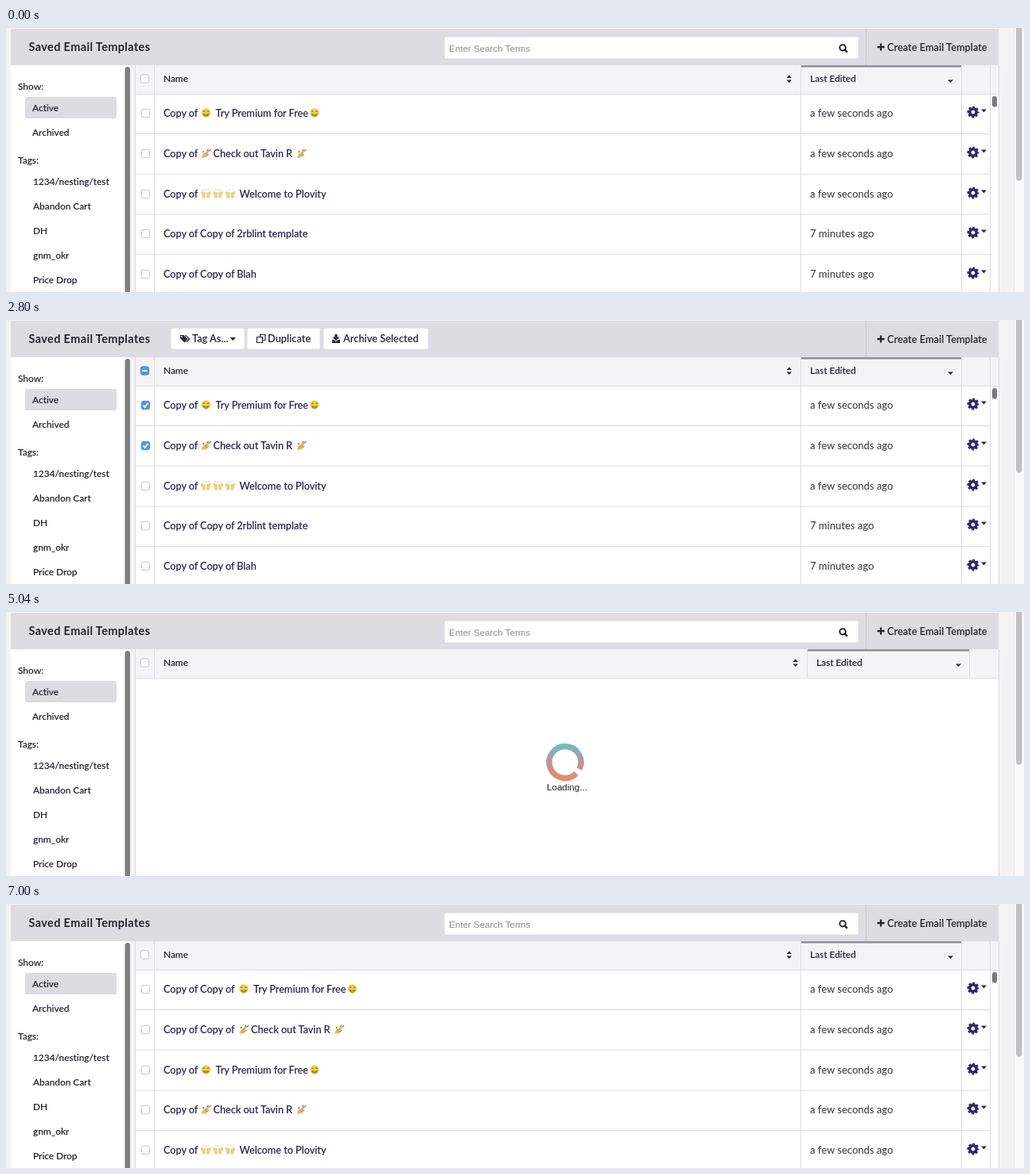
Recreate the animation shown at these times as an HTML page. Size 1280x333 px, loop 7.07 s.

```html
<!DOCTYPE html>
<html lang="en">
<head>
<meta charset="utf-8">
<title>Saved Email Templates</title>
<style>
html, body { margin: 0; width: 100%; height: 100%; overflow: hidden; background: #f3f3f6; }
svg { display: block; }
text { font: 600 12.8px Lato, sans-serif; font-variant-ligatures: none; fill: #25232f; white-space: pre; }
.small { font-size: 12px; letter-spacing: -.1px; }
.title { font-size: 14.5px; font-weight: 700; letter-spacing: .36px; }
.name { fill: #2a2654; letter-spacing: -.1px; }
.date { font-weight: 500; font-size: 13px; fill: #42414b; }
.plain { font: 11.6px "Liberation Sans", Arial, sans-serif; }
.hint { fill: #8e8e92; }
.line { stroke: #dcdce1; fill: none; }
.box { fill: #fff; stroke: #c6c6ca; }
.tick, .dash { fill: none; stroke: #fff; stroke-width: 1.8; visibility: hidden; }
.on .box, .part .box { fill: #5797d8; stroke: #4d8dcf; }
.on .tick, .part .dash { visibility: visible; }
</style>
</head>
<body>
<svg width="1280" height="333" viewBox="0 0 1280 333">
  <defs>
    <linearGradient id="ring" x1="0" y1="-23" x2="0" y2="23" gradientUnits="userSpaceOnUse">
      <stop offset=".08" stop-color="#77bac1"/>
      <stop offset=".5" stop-color="#bd919f"/>
      <stop offset=".9" stop-color="#e48c70"/>
    </linearGradient>
    <g id="money">
      <circle r="5.8" fill="#f1d045"/>
      <path d="M-3.8-1.8h2.4M1.4-1.8H3.8" stroke="#7d8a3a" stroke-width="1.6"/>
      <path d="M-4 1Q0 2.500 4 1Q3 4.500 0 4.500T-4 1" fill="#8c722d"/>
      <path d="M-1.500 2h3v2.500q-1.500 1.500-3 0z" fill="#8fae55"/>
    </g>
    <g id="nails">
      <path d="M-6 5L-3 0L3-4L5-3L2 0L4 1L3 3L0 5L-4 6Z" fill="#e3c06a"/>
      <path d="M-3 3L2-1M-1 4L3 1" stroke="#b0924f" stroke-width=".8"/>
      <path d="M-4-1l1.500-2M1-3l2-2M4-3l2-2" stroke="#9a6f74" stroke-width="1.3"/>
    </g>
    <g id="hands">
      <path id="hand" d="M-1 5L-4 5L-4.500 2L-6-2L-4.500-3L-3 0L-2.500-2L-1.200-1.500L-1 2Z" fill="#f0d678" stroke="#d3b65c" stroke-width=".5"/>
      <use href="#hand" transform="scale(-1 1)"/>
      <path d="M-4-6l1 1.500M0-6v2M4-6l-1 1.500" stroke="#dccb97"/>
    </g>
    <g id="gear" fill="#2b2967">
      <circle r="4.2" fill="none" stroke="#2b2967" stroke-width="3.6"/>
      <circle r="6.2" fill="none" stroke="#2b2967" stroke-width="2.6" stroke-dasharray="2.7 2.169" stroke-dashoffset="1.35"/>
      <path d="M10-3.5h7l-3.5 4z"/>
    </g>
  </defs>

  <path d="M6 1H1248V47H6z" fill="#dedce3"/>
  <path d="M1081.5 1V47" stroke="#c8c6cf"/>
  <text class="title" x="28.5" y="28.5">Saved Email Templates</text>
  <path d="M1095.5 24h9M1100 19.5v9" stroke="#25232f" stroke-width="2.3"/>
  <text x="1108" y="28.5">Create Email Template</text>

  <g id="search">
    <rect x="551.5" y="11.5" width="520" height="27" rx="2" fill="#fff"/>
    <text class="plain hint" x="557" y="29.5">Enter Search Terms</text>
    <circle cx="1052" cy="24.8" r="3.7" fill="none" stroke="#1e1d25" stroke-width="1.9"/>
    <path d="M1054.8 27.6l3 3" stroke="#1e1d25" stroke-width="2.3"/>
  </g>
  <g id="tools">
    <rect x="207.5" y="10.5" width="92" height="26" rx="2" fill="#fff"/>
    <path d="M219 19h4.5l5 5-4 4.5-5.5-5.5zM225 19h1.5l5 5-4 4.5-1-1 3-3.5z" fill="#25232f"/>
    <circle cx="221" cy="21" r="1" fill="#fff"/>
    <text x="234" y="28">Tag As...</text>
    <path d="M281.5 22h7.5l-3.75 4z" fill="#25232f"/>
    <rect id="dup" x="303.5" y="10.5" width="91" height="26" rx="2" fill="#fff"/>
    <path d="M319.5 21v-2.5h6.5v7h-3M315.5 21.5h7v7h-7z" fill="none" stroke="#25232f" stroke-width="1.2"/>
    <text x="329" y="28">Duplicate</text>
    <rect x="399.5" y="10.5" width="131" height="26" rx="2" fill="#fff"/>
    <path d="M413.5 18h3v3.5h3l-4.5 4.5-4.5-4.5h3zM410 25h2.5l2.5 2.3 2.5-2.3h2.5v4h-10z" fill="#25232f"/>
    <text x="424" y="28">Archive Selected</text>
  </g>

  <path d="M6 47H156V333H6z" fill="#fff"/>
  <rect x="149.5" y="49" width="6.5" height="290" rx="3" fill="#7f7f7f"/>
  <rect x="24" y="87" width="115" height="27" rx="2" fill="#dedce3"/>
  <g id="side"></g>

  <path d="M163 47H1248V333H163z" fill="#fff"/>
  <path d="M163 47H1248V83H163z" fill="#f4f4f7"/>
  <path class="line" d="M162.5 47V333M1248.5 47V333M163 83.5H1248M186.5 47V83"/>
  <g id="all" transform="translate(174.5 64)"></g>
  <text class="small" x="198" y="68">Name</text>
  <g id="sort">
    <path d="M981.5 63h6.5l-3.25-3.5zM981.5 65.5h6.5l-3.25 3.5z" fill="#25232f"/>
    <path class="line" d="M999.5 47V83"/>
    <text class="small" x="1011" y="68">Last Edited</text>
  </g>
  <rect id="bar" y="47" height="2.5" fill="#919197"/>
  <g id="end">
    <path d="M1184 65.5h7l-3.5 3.5z" fill="#25232f"/>
    <path class="line" d="M1201.5 47V83"/>
  </g>
  <g id="grid">
    <path class="line" d="M186.5 83V333M999.5 83V333M1201.5 83V333M1237.5 47V333"/>
    <rect x="1240" y="86" width="6" height="13.5" rx="2.5" fill="#7b7b7b"/>
    <g id="before"></g>
    <g id="after"></g>
  </g>
  <g id="loading">
    <g id="spin">
      <path id="arc" fill="none" stroke="url(#ring)" stroke-width="7.3"/>
    </g>
    <text class="plain" x="680" y="225">Loading...</text>
  </g>

  <path d="M1267 0H1280V333H1267z" fill="#fafafa"/>
  <path d="M1267.5 0V333" stroke="#e9e9eb"/>
  <rect x="1270" y="-5" width="7.5" height="197.5" rx="3.7" fill="#c1c1c3"/>
</svg>
<script>
const LOOP = 7070, FIRST = 1890, SECOND = 2450, HOVER = 3500, LOAD = 4480, READY = 5250;
const el = id => document.getElementById(id);
const show = (id, on) => el(id).style.display = on ? '' : 'none';
const text = (x, y, s, cls) => `<text x="${x}" y="${y}" class="${cls}">${s}</text>`;
const icon = (id, x, y) => `<use href="#${id}" x="${x}" y="${y}"/>`;
const check = '<rect class="box" x="-5.2" y="-5.2" width="10.4" height="10.4" rx="2.5"/>' +
  '<path class="tick" d="M-2.8.2L-.8 2.5L3-2.8"/><path class="dash" d="M-3.2 0H3.2"/>';

// Each label draws itself at a horizontal offset and a row centre.
const money = (dx, y) => icon('money', 251.5 + dx, y) +
  text(263.5 + dx, y + 4.5, 'Try Premium for Free', 'name') + icon('money', 388 + dx, y);
const nails = (dx, y) => icon('nails', 251.5 + dx, y) +
  text(260.5 + dx, y + 4.5, 'Check out Tavin R', 'name') + icon('nails', 371.5 + dx, y);
const hands = (dx, y) => [251.5, 266.5, 282].map(x => icon('hands', x + dx, y)).join('') +
  text(293.5 + dx, y + 4.5, 'Welcome to Plovity', 'name');
const copy = (label, twice) => y =>
  text(198, y + 4.5, twice ? 'Copy of Copy of' : 'Copy of', 'name') + label(twice ? 47.5 : 0, y);
const words = s => y => text(198, y + 4.5, s, 'name');

function fill(id, rows, recent) {
  el(id).innerHTML = rows.map((label, i) => {
    const step = i * 50.75, y = 107 + Math.round(step);
    return `<g class="pick" transform="translate(175.5 ${y + .5})">${check}</g>` + label(y) +
      text(1011, y + 4.5, i < recent ? 'a few seconds ago' : '7 minutes ago', 'date') +
      icon('gear', 1216, y - 1) + `<path class="line" d="M163 ${133.5 + step}H1238"/>`;
  }).join('');
}
fill('before', [copy(money), copy(nails), copy(hands),
  words('Copy of Copy of 2rblint template'), words('Copy of Copy of Blah')], 3);
fill('after', [copy(money, true), copy(nails, true), copy(money), copy(nails), copy(hands)], 5);
el('all').innerHTML = check;
el('side').innerHTML = [
  [15, 77.5, 'Show:'], [33, 104.5, 'Active'], [33, 135.5, 'Archived'], [15, 171, 'Tags:'],
  ...['1234/nesting/test', 'Abandon Cart', 'DH', 'gnm_okr', 'Price Drop']
    .map((s, i) => [34, 198 + i * 31.1, s])
].map(([x, y, s]) => text(x, y, s, 'small')).join('');

const polar = deg => [20 * Math.cos(deg * Math.PI / 180), 20 * Math.sin(deg * Math.PI / 180)];
el('arc').setAttribute('d', `M${polar(45)}A20 20 0 1 1 ${polar(26)}`);
const picks = el('before').querySelectorAll('.pick');

function draw(t) {
  const busy = t >= LOAD && t < READY, picked = t >= FIRST && t < LOAD;
  show('tools', picked);
  show('search', !picked);
  show('grid', !busy);
  show('loading', busy);
  show('before', t < LOAD);
  show('after', t >= READY);
  el('all').classList.toggle('part', picked);
  picks[0].classList.toggle('on', picked);
  picks[1].classList.toggle('on', picked && t >= SECOND);
  el('dup').setAttribute('fill', t >= HOVER ? '#f3f2f5' : '#fff');
  el('sort').setAttribute('transform', `translate(${busy ? 8 : 0})`);
  el('end').setAttribute('transform', `translate(${busy ? 10 : 0})`);
  el('bar').setAttribute('x', busy ? 1008 : 1000);
  el('bar').setAttribute('width', busy ? 204 : 202);
  el('spin').setAttribute('transform', `translate(703 189.5) rotate(${(t - 5040) * .36})`);
}
const start = performance.now();
function frame() {
  const t = (performance.now() - start) % LOOP;
  draw(Math.floor(t / 70) * 70);
  requestAnimationFrame(frame);
}
frame();
</script>
</body>
</html>
```
